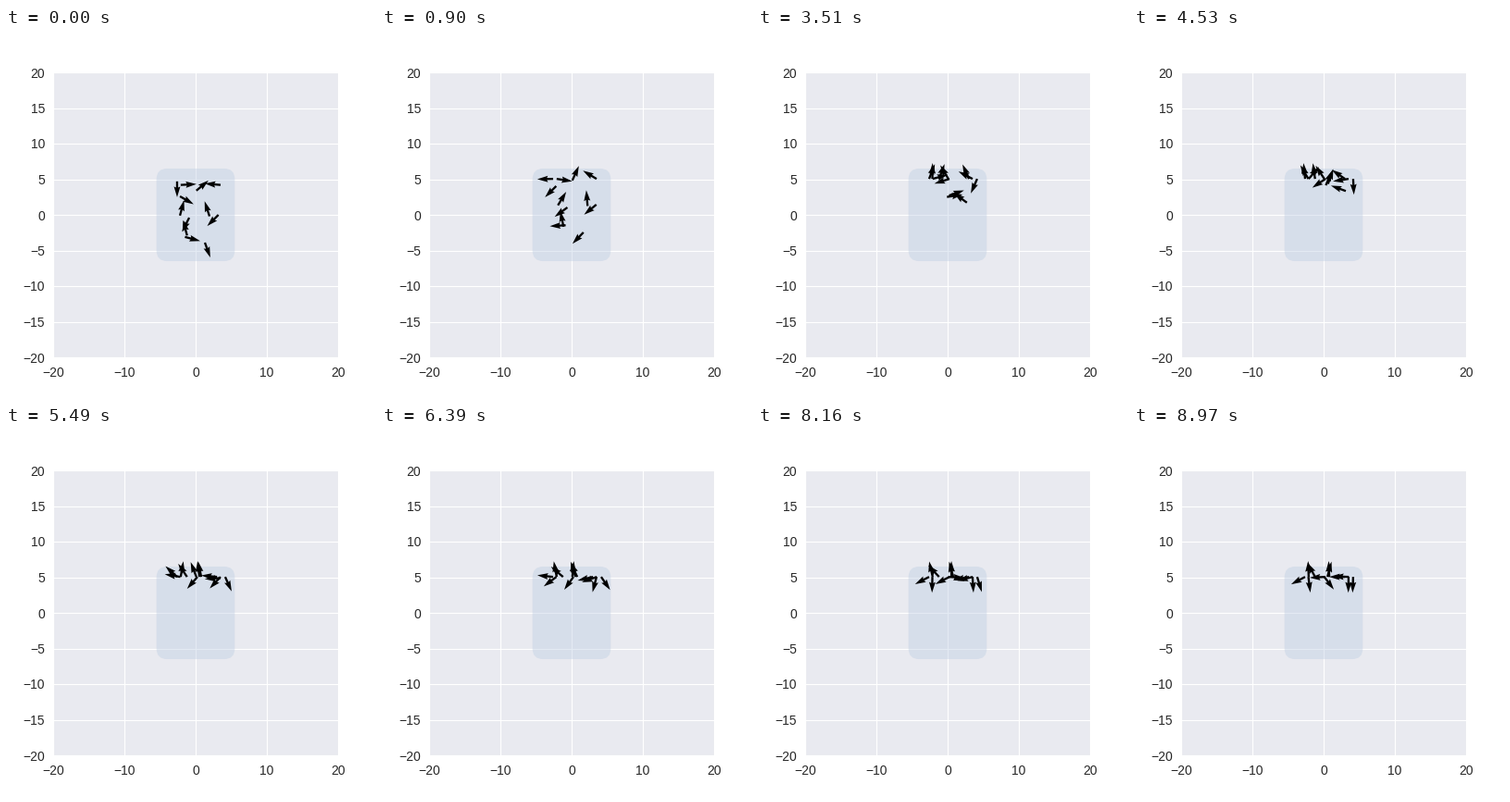
A matplotlib script for the animation above (9 s loop, 400 by 400 pixels).

```python
import numpy as np
import matplotlib.pyplot as plt
from matplotlib.animation import FuncAnimation
from matplotlib.patches import FancyBboxPatch

FRAMES, INTERVAL = 300, 30
TOP, RISE = 5.05, 0.048  # upper wall and climb per step

# start x, start y, first heading, last heading, swing between them (degrees)
AGENTS = [
    (-2.6, 4.7, 270, 208, -145), (-2.1, 4.2, 3, 92, 0),
    (0.1, 3.4, 40, -53, 130), (3.5, 4.2, 175, 269, -35),
    (-2.2, 2.6, -30, -83, -185), (-2.2, -0.1, 75, 118, 0),
    (1.95, -0.2, 108, 180, 0), (3.2, 0.0, 225, 268, 25),
    (-0.9, -0.4, 243, 183, 0), (-1.2, -2.9, 105, 452, 150),
    (-1.5, -3.1, -15, 435, 215), (1.3, -3.9, 290, 178, -75),
]
X, Y, FIRST, LAST, SWING = np.array(AGENTS).T

DRIFT = np.clip(0.003 * (3 - Y), 0, 0.012)  # deep starters slide right
SWAY = 0.2 * SWING - 35                     # slower second wobble


def positions(step):
    """Agents rise steadily and stay where they meet the upper wall."""
    t = np.minimum(step, (TOP - Y) / RISE)
    return np.column_stack([X + DRIFT * t, Y + RISE * t])


def directions(step):
    """Turn from first to last heading with one broad swing and a sway."""
    u = step / (FRAMES - 1)
    angle = (FIRST + (LAST - FIRST) * u
             + SWING * np.sin(np.pi * u) + SWAY * np.sin(2 * np.pi * u))
    a = np.radians(angle)
    return np.cos(a), np.sin(a)


plt.rcParams.update({"font.family": "Liberation Sans", "font.size": 10})

fig = plt.figure(figsize=(4, 4), dpi=100, facecolor="white")
ax = fig.add_axes([0.125, 0.11, 0.775, 0.77], facecolor="#E9EAF0")
ax.set_aspect("equal")
ax.set(xlim=(-20, 20), ylim=(-20, 20),
       xticks=range(-20, 21, 10), yticks=range(-20, 21, 5))
ax.set_axisbelow(True)
ax.grid(color="white", linewidth=0.8)
ax.tick_params(length=0, pad=7, labelcolor="0.15")
ax.tick_params(axis="y", pad=6.5)
ax.spines[:].set_visible(False)

ax.add_patch(FancyBboxPatch((-4, -5), 8, 10, boxstyle="round,pad=1.5",
                            facecolor="#BBCCE1", edgecolor="none", alpha=0.4))

arrows = ax.quiver(*positions(0).T, *directions(0), color="black",
                   scale=18, width=0.0075, units="width", zorder=3)


def update(step):
    arrows.set_offsets(positions(step))
    arrows.set_UVC(*directions(step))
    return (arrows,)


anim = FuncAnimation(fig, update, frames=FRAMES, interval=INTERVAL,
                     repeat=True, repeat_delay=0)
plt.show()
```
